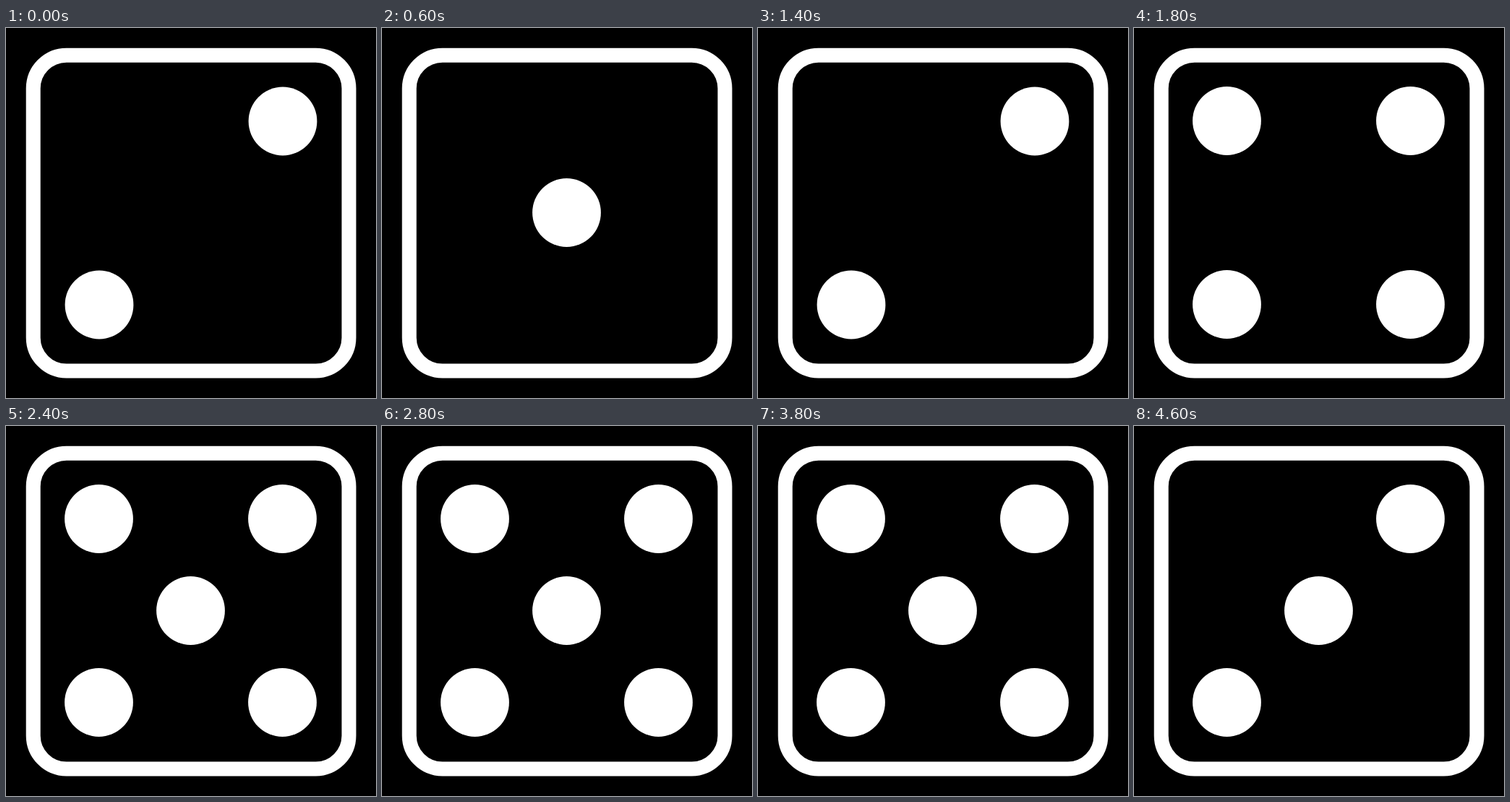
Animation, 512 px wide and 512 px high, one loop 4800 ms. Source, as an HTML page with a canvas:

```html
<!DOCTYPE html>
<html lang="en">
<head>
<meta charset="utf-8">
<title>Rolling die</title>
<style>
  html, body { margin: 0; width: 100%; height: 100%; overflow: hidden; background: #000; }
  canvas { display: block; width: 100vw; height: 100vh; object-fit: contain; }
</style>
</head>
<body>
<canvas id="die" width="512" height="512"></canvas>
<script>
const ctx = document.getElementById("die").getContext("2d");
const ROLLS = "246153621432545163254613";
const HOLD = 200;
const PITCH = 127;
const RADIUS = 47.4;

// Pip positions as [column, row] steps from the centre
const DIAGONAL = [[1, -1], [-1, 1]];
const CORNERS = [...DIAGONAL, [-1, -1], [1, 1]];
const SIDES = [[-1, 0], [1, 0]];

function pips(face) {
  const list = face % 2 ? [[0, 0]] : [];
  if (face > 3) list.push(...CORNERS);
  else if (face > 1) list.push(...DIAGONAL);
  if (face === 6) list.push(...SIDES);
  return list;
}

function drawFace(face) {
  ctx.fillStyle = "#000";
  ctx.fillRect(0, 0, 512, 512);

  ctx.strokeStyle = "#fff";
  ctx.lineWidth = 20;
  ctx.beginPath();
  ctx.roundRect(37.7, 37.7, 436.8, 436.8, 46);
  ctx.stroke();

  ctx.fillStyle = "#fff";
  const mid = face === 2 ? 256 : 255.5;
  for (const [col, row] of pips(face)) {
    ctx.beginPath();
    ctx.arc(mid + col * PITCH, mid + row * PITCH, RADIUS, 0, Math.PI * 2);
    ctx.fill();
  }
}

const start = performance.now();

function tick(now) {
  const step = Math.floor(Math.max(0, now - start) / HOLD) % ROLLS.length;
  drawFace(Number(ROLLS[step]));
  requestAnimationFrame(tick);
}

tick(start);
</script>
</body>
</html>
```
